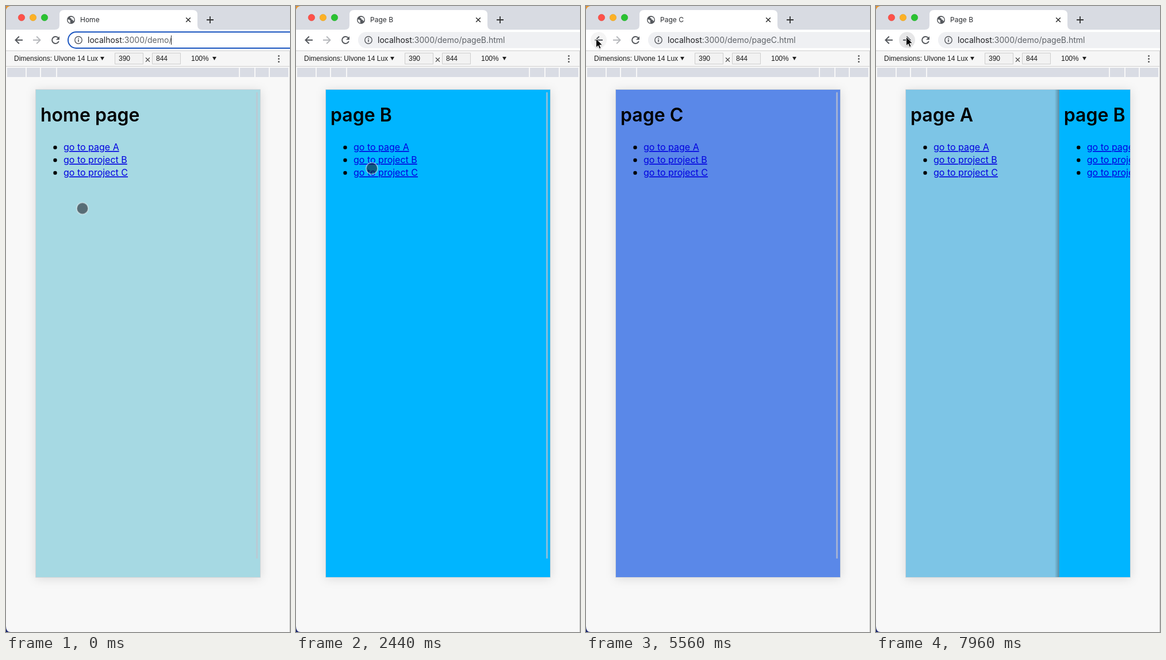
Animation, 494 px wide and 1084 px high, one loop 8000 ms. Source, as an HTML page:

```html
<!DOCTYPE html>
<html lang="en">
<head>
<meta charset="utf-8">
<title>Page transitions</title>
<style>
html, body { margin: 0; width: 100%; height: 100%; overflow: hidden; background: #f8f8f8; }
svg { display: block; width: 494px; height: 1084px; }
text { font-family: Inter, "Open Sans", sans-serif; white-space: pre; }
.title { font-size: 12px; fill: #2b2d31; }
.url { font-size: 14px; fill: #5f6368; }
.url tspan { fill: #202124; }
.tool text { font: 12px "Liberation Sans", Arial, sans-serif; fill: #1c1c1c; }
.h1 { font-size: 32px; font-weight: 600; }
.link { font-size: 16px; fill: #0000e0; text-decoration: underline; }
.red { fill: #f8101c; }
.icon { fill: none; stroke: #55585d; stroke-width: 2; }

/* One loop is 8 s: 1% = 80 ms */
.loop { animation: 8s linear infinite; }
.step { animation: 8s step-end infinite; }
.slide { animation: 8s ease infinite; }

.slide-a { animation-name: slideA; }
.slide-b { animation-name: slideB; }
.slide-c { animation-name: slideC; }
@keyframes slideA {
  0%, 10% { transform: translateX(398px); }
  15%, 100% { transform: none; }
}
@keyframes slideB {
  0%, 24.09% { transform: translateX(398px); }
  29.09%, 79.94% { transform: translateX(0); }
  84.94% { transform: translateX(398px); }
  98.4375% { transform: translateX(398px); animation-timing-function: cubic-bezier(.4, .093, .6, .558); }
  100% { transform: translateX(184px); }
}
@keyframes slideC {
  0%, 38.5% { transform: translateX(398px); }
  43.5%, 71.2% { transform: translateX(0); }
  76.2%, 100% { transform: translateX(398px); }
}

.on-home { animation-name: onHome; }
.on-a { animation-name: onA; }
.on-b { animation-name: onB; }
.on-c { animation-name: onC; }
@keyframes onHome { 0% { visibility: visible; } 9.75%, 100% { visibility: hidden; } }
@keyframes onA {
  0% { visibility: hidden; } 9.75% { visibility: visible; } 23.8% { visibility: hidden; }
  79.75% { visibility: visible; } 98.25%, 100% { visibility: hidden; }
}
@keyframes onB {
  0% { visibility: hidden; } 23.8% { visibility: visible; } 38.25% { visibility: hidden; }
  70.95% { visibility: visible; } 79.75% { visibility: hidden; } 98.25%, 100% { visibility: visible; }
}
@keyframes onC { 0% { visibility: hidden; } 38.25% { visibility: visible; } 70.95%, 100% { visibility: hidden; } }

.focus { animation-name: focus; }
@keyframes focus { 0% { visibility: visible; } 8%, 100% { visibility: hidden; } }

.tap-a { animation-name: tapA; }
.tap-b { animation-name: tapB; }
.tap-c { animation-name: tapC; }
@keyframes tapA { 0% { visibility: hidden; } 8% { visibility: visible; } 16%, 100% { visibility: hidden; } }
@keyframes tapB { 0% { visibility: hidden; } 23.45% { visibility: visible; } 30%, 100% { visibility: hidden; } }
@keyframes tapC { 0% { visibility: hidden; } 37.4% { visibility: visible; } 44%, 100% { visibility: hidden; } }

.back { animation-name: back; }
.ahead { animation-name: ahead; }
@keyframes back {
  0%, 61.5% { fill-opacity: 0; }
  63%, 69.5% { fill-opacity: .05; }
  70.5%, 73.5% { fill-opacity: .11; }
  76%, 77.5% { fill-opacity: .05; }
  78.5%, 82% { fill-opacity: .11; }
  85%, 90.5% { fill-opacity: .05; }
  92%, 100% { fill-opacity: 0; }
}
@keyframes ahead {
  0%, 92.5% { fill-opacity: 0; }
  94%, 98% { fill-opacity: .05; }
  99%, 100% { fill-opacity: .11; }
}
.enabled { animation-name: enabled; }
@keyframes enabled { 0% { stroke: #b6b8bc; } 70.95%, 100% { stroke: #55585d; } }

.pointer { animation: pointer 8s ease-in-out infinite; }
@keyframes pointer {
  0% { transform: translate(133px, 350.5px); }
  7.5%, 14.4% { transform: translate(129px, 246px); }
  20%, 29% { transform: translate(126px, 263px); animation-timing-function: ease-out; }
  30.5% { transform: translate(132px, 281px); animation-timing-function: ease-out; }
  33%, 56.25% { transform: translate(132px, 288.5px); }
  63%, 65% { transform: translate(17px, 53px); }
  67%, 90% { transform: translate(17px, 56px); }
  95%, 100% { transform: translate(52px, 53px); }
}
.touch { animation-name: touch; }
.arrow { animation-name: arrow; }
@keyframes touch { 0% { visibility: visible; } 60%, 100% { visibility: hidden; } }
@keyframes arrow { 0% { visibility: hidden; } 60%, 100% { visibility: visible; } }
</style>
</head>
<body>
<svg viewBox="0 0 494 1084">
  <defs>
    <clipPath id="screen"><path d="M0 0h390v844H0z"/></clipPath>
    <clipPath id="globe"><circle cx="113" cy="24" r="7"/></clipPath>
    <linearGradient id="edge">
      <stop offset="0" stop-opacity="0"/>
      <stop offset="1" stop-opacity=".3"/>
    </linearGradient>
    <filter id="blur" x="-20%" y="-20%" width="140%" height="140%"><feGaussianBlur stdDeviation="9"/></filter>
    <filter id="soft" x="-50%" y="-50%" width="200%" height="200%"><feGaussianBlur stdDeviation="1"/></filter>
    <path id="shade" d="M-8 0h8v844h-8z" fill="url(#edge)"/>
    <g id="list">
      <circle cx="33.5" cy="100" r="3.2"/>
      <circle cx="33.5" cy="122" r="3.2"/>
      <circle cx="33.5" cy="144" r="3.2"/>
      <text class="link" x="48" y="105">go to page A</text>
      <text class="link" x="48" y="127">go to project B</text>
      <text class="link" x="48" y="149">go to project C</text>
      <rect x="383" y="4" width="3" height="808" rx="1.5" fill="#c3c3cd" fill-opacity=".68"/>
    </g>
  </defs>

  <!-- Window -->
  <path d="M0 0h12v12H0z" fill="#e8952e"/>
  <path d="M0 1070h14v14H0z" fill="#14206e"/>
  <path d="M0 1074V10Q0 0 10 0H494V1084H8Q0 1084 0 1074z" fill="#f8f8f8"/>
  <path d="M0 41V10Q0 0 10 0H494V41z" fill="#d8dbe2"/>
  <path d="M0 41h494v36H0z" fill="#fff"/>
  <circle cx="27" cy="20" r="5.7" fill="#fe5148" stroke="#e0443e" stroke-width=".6"/>
  <circle cx="47" cy="20" r="5.7" fill="#fdb125" stroke="#dea123" stroke-width=".6"/>
  <circle cx="67" cy="20" r="5.7" fill="#2ac231" stroke="#1aab29" stroke-width=".6"/>

  <!-- Tab -->
  <path d="M85 41q8 0 8-8V15q0-8 8-8H325q8 0 8 8V33q0 8 8 8z" fill="#fff"/>
  <circle cx="113" cy="24" r="7" fill="#55585d"/>
  <path d="M105 23l4 .5 3 2.5-1 2 1.500 4-5-2zM112 17l-1 3 3 1v2l3 1 1 3 4-4-3-5z" fill="#fff" clip-path="url(#globe)" transform="translate(22.600 4.800) scale(.8)"/>
  <path class="icon" d="M313.200 20.200l7.600 7.600m0-7.600l-7.600 7.600" style="stroke:#333;stroke-width:1.600"/>
  <path class="icon" d="M349 24h12m-6-6v12" style="stroke:#333;stroke-width:1.800"/>

  <!-- Address bar -->
  <circle class="loop back" cx="22" cy="59" r="14" fill="#20242c"/>
  <circle class="loop ahead" cx="54" cy="59" r="14" fill="#20242c"/>
  <path class="icon" d="M29 59H16.500m6.300-6.300L16.500 59l6.300 6.300"/>
  <path class="icon step enabled" d="M47 59h12.500m-6.300-6.300l6.300 6.300-6.300 6.300"/>
  <path class="icon" d="M90.800 55.200A6 6 0 1 0 91.800 61"/>
  <path d="M93 52.500v6h-6z" fill="#55585d"/>
  <rect x="108" y="45" width="420" height="28" rx="14" fill="#eff0f3"/>
  <rect class="step focus" x="108" y="45" width="420" height="28" rx="14" fill="#fff" stroke="#1c56c0" stroke-width="2"/>
  <path class="step focus" d="M287.500 51v16" stroke="#222"/>
  <circle class="icon" cx="126" cy="59" r="6.200" style="stroke-width:1.400"/>
  <path d="M125.200 58h1.600v4.200h-1.600zM125.200 55.400h1.600v1.500h-1.600z" fill="#55585d"/>
  <g class="step on-home">
    <text class="title" x="129" y="28">Home</text>
    <text class="url" x="142" y="64"><tspan>localhost</tspan>:3000/demo/</text>
  </g>
  <g class="step on-a">
    <text class="title" x="129" y="28">Page A</text>
    <text class="url" x="142" y="64"><tspan>localhost</tspan>:3000/demo/pageA.html</text>
  </g>
  <g class="step on-b">
    <text class="title" x="129" y="28">Page B</text>
    <text class="url" x="142" y="64"><tspan>localhost</tspan>:3000/demo/pageB.html</text>
  </g>
  <g class="step on-c">
    <text class="title" x="129" y="28">Page C</text>
    <text class="url" x="142" y="64"><tspan>localhost</tspan>:3000/demo/pageC.html</text>
  </g>

  <!-- Device toolbar -->
  <g class="tool">
    <path d="M0 77h494v28H0z" fill="#f6f6f6"/>
    <path d="M0 77.500h494M0 104.500h494" stroke="#cfcfcf"/>
    <text x="14" y="95">Dimensions: Ulvone 14 Lux</text>
    <path d="M164 88h7l-3.500 6zM359 88h7l-3.500 6z" fill="#222"/>
    <path d="M189.500 81.500h49v19h-49zM254.500 81.500h49v19h-49z" fill="#f2f2f2" stroke="#cdcdcd"/>
    <text x="196" y="95">390</text>
    <text x="261" y="95">844</text>
    <text x="322" y="95">100%</text>
    <path d="M243 89.500l7 7m0-7l-7 7" stroke="#444" stroke-width="1.100"/>
    <g fill="#5c5c5c">
      <circle cx="474.500" cy="86.500" r="1.500"/>
      <circle cx="474.500" cy="91.500" r="1.500"/>
      <circle cx="474.500" cy="96.500" r="1.500"/>
    </g>
    <path d="M2 107h32v16H2zm34 0h23v16H36zm25 0h26v16H61zm28 0h316v16H89zm318 0h25v16h-25zm27 0h23v16h-23zm25 0h32v16h-32z" fill="#d9dce4"/>
  </g>
  <path d="M493.500 78v1006" stroke="#c9c9c9"/>

  <!-- Device -->
  <rect x="52" y="147" width="390" height="844" fill-opacity=".13" filter="url(#blur)"/>
  <path d="M51.500 144.500h391v845h-391z" fill="none" stroke="#d3d6d9"/>
  <g transform="translate(52 145)" clip-path="url(#screen)">
    <path d="M0 0h390v844H0z" fill="#a6d9e3"/>
    <text class="h1" x="8" y="55">home page</text>
    <use href="#list"/>
    <text class="link red step tap-a" x="48" y="105">go to page A</text>
    <g class="slide slide-a">
      <use href="#shade"/>
      <path d="M0 0h390v844H0z" fill="#7dc5e6"/>
      <text class="h1" x="8" y="55">page A</text>
      <use href="#list"/>
      <text class="link red step tap-b" x="48" y="127">go to project B</text>
    </g>
    <g class="slide slide-b">
      <use href="#shade"/>
      <path d="M0 0h390v844H0z" fill="#00b5ff"/>
      <text class="h1" x="8" y="55">page B</text>
      <use href="#list"/>
      <text class="link red step tap-c" x="48" y="149">go to project C</text>
    </g>
    <g class="slide slide-c">
      <use href="#shade"/>
      <path d="M0 0h390v844H0z" fill="#5a88e8"/>
      <text class="h1" x="8" y="55">page C</text>
      <use href="#list"/>
    </g>
  </g>

  <!-- Pointer -->
  <g class="pointer">
    <circle class="step touch" r="10" fill="#191920" fill-opacity=".56" stroke="#fff" stroke-opacity=".5" stroke-width="1.600"/>
    <g class="step arrow">
      <path d="M0 2v15l4-3.500 2.500 6 2.500-1-2.500-6H12z" fill-opacity=".35" filter="url(#soft)"/>
      <path d="M.500.500v15.500l3.600-3.300 2.300 5.400 2.600-1.100-2.300-5.300h5z" stroke="#fff"/>
    </g>
  </g>
</svg>
</body>
</html>
```
